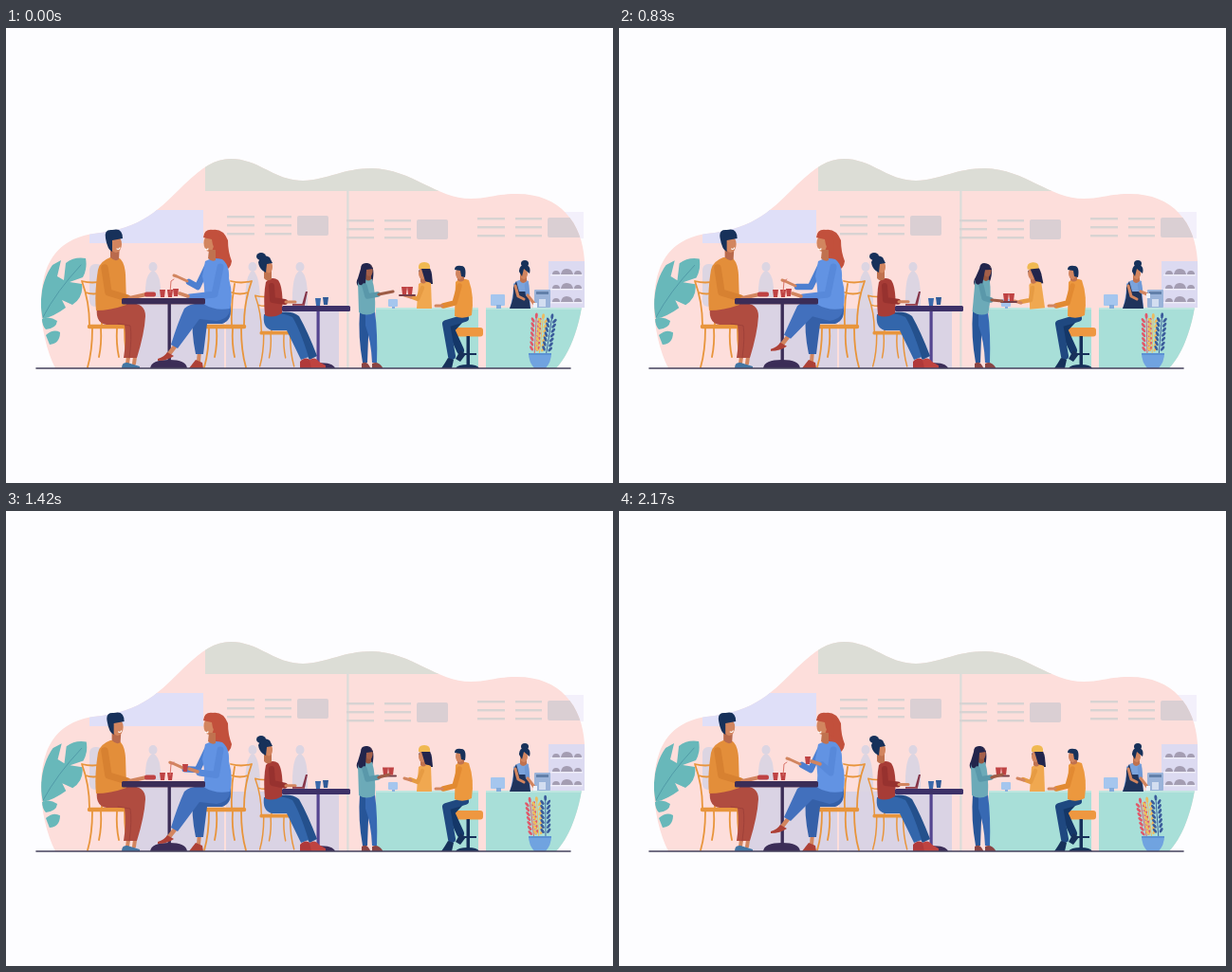
An HTML page that plays this animation: 640 px wide and 480 px high, repeating every 2.26 s.

```html
<!DOCTYPE html>
<html lang="en">
<head>
<meta charset="utf-8">
<title>Cafe</title>
<style>
  html, body { margin: 0; width: 100%; height: 100%; overflow: hidden; background: #fdfdff; }
  svg { display: block; width: 100vw; height: 100vh; }
</style>
</head>
<body>
<svg id="stage" viewBox="0 0 640 480" xmlns="http://www.w3.org/2000/svg"></svg>
<script>
const LOOP = 2260, STEPS = 27;
const NAVY = '#17315a', RUST = '#ad4036', CHAIR = '#e8953c', SKIN = '#d2855f', DARK = '#3b2d57', CUP = '#bf4243';

// Drawing helpers
const fill = (d, c) => `<path d="${d}" fill="${c}"/>`;
const line = (d, c, w = 1.5) =>
  `<path d="${d}" fill="none" stroke="${c}" stroke-width="${w}" stroke-linecap="round" stroke-linejoin="round"/>`;
const rect = (x, y, w, h, c, r = 0) => `<rect x="${x}" y="${y}" width="${w}" height="${h}" rx="${r}" fill="${c}"/>`;
const oval = (x, y, rx, ry, c) => `<ellipse cx="${x}" cy="${y}" rx="${rx}" ry="${ry}" fill="${c}"/>`;
const move = (x, y, body) => `<g transform="translate(${x} ${y})">${body}</g>`;
const turn = (a, x, y, body) => `<g transform="rotate(${a} ${x} ${y})">${body}</g>`;
const repeat = (n, f) => Array.from({ length: n }, (_, i) => f(i)).join('');
const mix = (a, b, k) => a + (b - a) * k;

// Eased 0..1 ramp between two steps
function ramp(s, from, to) {
  const k = Math.min(1, Math.max(0, (s - from) / (to - from)));
  return k * k * (3 - 2 * k);
}

const BLOB = 'M52 359C42 339 36 311 37 287C38 244 58 222 92 217C145 212 162 190 188 165' +
  'C207 147 220 138 237 138C267 138 282 161 313 161C340 160 355 148 386 148' +
  'C428 149 454 180 490 180C507 180 518 175 537 175C583 174 608 205 610 246C612 293 600 338 580 359Z';

function menu(x, y, boxW = 33) {
  const c = '#d8d3d2';
  return repeat(3, i => rect(x, y + i * 9, 29, 2.4, c) + rect(x + 40, y + i * 9, 28, 2.4, c)) +
    rect(x + 74, y, boxW, 21, '#dacfd3', 2);
}

function shelf(y) {
  const c = '#a49db2';
  return rect(574, y, 34, 1.4, '#efeef8') +
    fill(`M576 ${y}q0-4 4-4q4 0 4 4zM585 ${y}q1-6 6-6q6 0 7 6zM599 ${y}q0-4 4-4q4 0 4 4z`, c);
}

function leaf() {
  const c = '#68b8ba';
  return fill('M39 307C34 289 38 265 49 250L58 245L54 262L61 266L63 248Q72 241 84 243' +
      'Q86 254 81 263L67 268L80 270Q82 284 70 292L59 287L63 295Q51 304 39 307Z', c) +
    line('M39 305Q53 278 79 250', '#4b93a3', .8) +
    fill('M38 307Q46 303 54 309Q53 317 42 318Q38 314 38 307Z', c) +
    fill('M42 324Q50 317 57 321Q57 333 46 334Z', c);
}

function room() {
  const shade = '#dcd5e2', band = '#dad3e4';
  const guest = (x, y, h) => oval(x, y, 4.5, 5, shade) +
    fill(`M${x - 8} ${y + h}Q${x - 9} ${y + 7} ${x} ${y + 4}Q${x + 9} ${y + 7} ${x + 8} ${y + h}Z`, shade);
  return `<clipPath id="blob"><path d="${BLOB}"/></clipPath>` +
    rect(571, 194, 38, 28, '#f3f0fb') + '<g clip-path="url(#blob)">' +
    rect(30, 130, 590, 235, '#fddedb') +
    rect(210, 136, 260, 36, '#dcddd6') +
    rect(88, 192, 120, 35, '#dfdff8') +
    rect(359.3, 171, 2.2, 188, '#dbdcd9') +
    menu(233, 198) + menu(359, 202) + menu(497, 200, 37) +
    rect(88, 249, 14, 45, shade, 6) +
    guest(155, 252, 32) + guest(260, 252, 52) + guest(310, 252, 42) +
    rect(136, 292, 94, 67, band) + rect(232, 296, 119, 63, band) +
    rect(390, 296, 108, 63, '#a8dfd8') + rect(506, 296, 105, 63, '#a8dfd8') +
    rect(390, 295, 108, 2, '#bfe6e0') + rect(506, 295, 105, 2, '#bfe6e0') +
    '</g>' + rect(572, 246, 38, 49, '#dcdaf1') + [260, 275, 289].map(shelf).join('');
}

// Side view cafe chair; flip = -1 mirrors it
function chair(x, y, flip, k = 1) {
  return `<g transform="translate(${x} ${y}) scale(${flip * k} ${k})">` +
    line('M-4-46Q4-24 4 0M14-43Q18-22 17 0M-4-46Q7-43 18-46M0-34Q8-31 17-34', CHAIR, 1.8) +
    line('M4 2H45', CHAIR, 4.5) +
    line('M7 4Q7 28 2 45M16 4Q17 20 14 34M41 4Q41 28 46 45M33 4Q32 20 35 34', CHAIR, 1.8) + '</g>';
}

const glass = (x, y, c = CUP) => fill(`M${x - 3} ${y - 4}h6l-1 8h-4z`, c);
const straw = (x, y) => line(`M${x} ${y}l1-12l3-2`, '#d9756a', 1);

function table() {
  return rect(170.5, 290, 3.4, 62, DARK) + fill('M152 359Q153 350 172 350Q190 350 191 359Z', DARK);
}

function man(s) {
  const nod = Math.sin(s / 27 * Math.PI) * 1.8;
  return chair(84, 313, 1) +
    line('M129 347L128 354M136 347L135 354', SKIN, 4) +
    fill('M97 289Q92 311 106 313L125 313Q127 330 124 348L138 348Q146 322 147 304Q147 290 130 290Z', '#b04c40') +
    line('M130 348Q133 326 131 314L118 312', '#9b3e38', .8) +
    fill('M122 359Q122 352 128 353L141 357V359Z', '#4376a3') +
    fill('M97 255Q99 246 110 242H118Q125 245 126 260L127 292Q110 298 95 298Q93 280 97 255Z', '#e38e3a') +
    line('M104 253L108 279L128 285', '#d78131', 7.5) +
    line('M130 285L148 281', SKIN, 4) +
    move(nod, 0, fill('M110 228H120L119 244Q115 247 110 242Z', '#b96a4d') +
      oval(116, 228, 6, 9, SKIN) +
      fill('M105 222Q103 212 112 213Q123 210 123 222L112 224L112 236Q107 234 105 222Z', NAVY) +
      line('M117 233q2 1 3-1', '#fff', 1.2));
}

function redhead(s) {
  const swing = (1 - Math.cos(s / 17 * 2 * Math.PI)) / 2;
  const footY = mix(348, 337, swing);
  const rest = ramp(s, 0, 5) - ramp(s, 16, 20);
  const handX = mix(180, 175, rest), handY = mix(262, 267, rest);
  const lift = ramp(s, 14, 20);
  const cupX = mix(179, 199, lift), cupY = mix(279, 263, lift);
  const kneeY = mix(299, 296, swing);
  return chair(255, 313, -1) +
    line('M204 340L203 352', SKIN, 4) +
    fill('M236 290Q240 308 228 312L212 312L208 344L200 344Q195 320 197 298Z', '#3560a8') +
    fill('M193 359Q196 355 200 350L207 353L208 359Z', RUST) +
    line(`M178 ${footY - 12}L171 ${footY - 3}`, SKIN, 4.5) +
    fill(`M236 288Q240 306 222 309L204 ${kneeY + 8}L181 ${footY - 10}L174 ${footY - 14}` +
      `Q181 ${kneeY + 12} 188 ${kneeY - 3}Q194 ${kneeY - 9} 208 ${kneeY - 8}Z`, '#4270bd') +
    fill(`M160 ${footY + 1}Q167 ${footY - 1} 170 ${footY - 6}L177 ${footY - 2}Q170 ${footY + 3} 160 ${footY + 3}Z`, RUST) +
    fill('M214 214Q228 209 234 224Q234 236 238 246Q237 254 230 256L215 245Z', '#c2503c') +
    line(`M212 252L202 273L${handX + 13} ${handY + 6}`, '#4d7fd0', 6.5) +
    line(`M${handX + 11} ${handY + 5}L${handX} ${handY}l-3-1`, SKIN, 3) +
    fill('M210 246Q218 241 228 244Q236 250 235 264Q240 282 236 296Q221 299 208 291Q211 277 207 262Z', '#6293e3') +
    oval(214, 227, 5.5, 9, SKIN) + fill('M214 234H221L221 245Q217 247 213 243Z', '#c0724f') +
    fill('M208 221Q209 211 219 213Q228 215 226 238Q218 235 217 223Z', '#c2503c') +
    line('M210 233q1 2 3 0', '#fff', 1.2) +
    line(`M226 252L${mix(220, 223, lift)} ${mix(281, 276, lift)}L${cupX + 15} ${cupY + 5}`, '#5889da', 7) +
    line(`M${cupX + 13} ${cupY + 4}L${cupX + 4} ${cupY + 1}`, SKIN, 3.5) + glass(cupX, cupY);
}

function tableTop() {
  return rect(122, 285, 88, 6.5, DARK, 1.5) + rect(146, 278.5, 12, 5, CUP, 2) + glass(165, 280) +
    glass(173, 280) + straw(173, 279);
}

function writer(s) {
  const tap = Math.sin(s * 1.6) * .8;
  return chair(266, 320, 1, .82) +
    rect(327.5, 298, 3.2, 56, '#544590') + fill('M312 359Q314 353 329 353Q345 353 347 359Z', DARK) +
    fill('M284 301Q300 297 309 304Q318 320 328 346L320 350L302 318Z', '#24508c') +
    fill('M272 302Q290 299 302 305Q310 318 319 347L311 350L296 319H280Q270 316 272 302Z', '#3366ab') +
    fill('M310 359V352Q314 347 319 349L325 355V359Z', '#b0393a') +
    fill('M322 359L320 350Q326 346 330 352L337 356V359Z', '#bf4340') +
    fill('M274 268Q280 261 287 266Q293 275 291 301Q281 307 273 303Q271 282 274 268Z', '#a73c36') +
    oval(269, 241, 5, 4, NAVY) + fill('M272 252h8v13q-5 3-8-1z', '#c0724f') + oval(277, 252, 4, 6.5, SKIN) +
    fill('M266 247Q270 237 278 242L281 248L275 249L274 258Q267 255 266 247Z', NAVY) +
    line(`M280 272L281 287L294 ${289 + tap}`, '#97322f', 6) + line(`M295 ${289 + tap}L305 ${289 + tap}`, SKIN, 3) +
    fill('M312 292L316 278L318 278L315 292Z', '#86364a') + rect(302, 291, 13, 1.8, '#95404c') +
    rect(291, 293, 72, 6, '#3d3168', 1.5) + glass(329, 289, '#3a69ab') + glass(337, 288, '#2f5a97');
}

function service(s) {
  const lean = ramp(s, 0, 6) - ramp(s, 13, 17);
  const give = ramp(s, 0, 10), take = ramp(s, 13, 17);
  const trayX = 423 - 12 * give - 8 * take, trayY = 282 + 7 * lean - 2.5 * take;
  const handX = mix(408, 404, Math.max(lean, take)), handY = mix(278, 288, lean);
  const serverX = mix(420, 417, lean), serverY = mix(282, 288, lean);
  const elbowY = mix(281, 287, lean), hair = '#22254c';
  const customer =
    fill('M373 299H384L382 326L381 353H376Q371 325 373 299Z', '#275598') +
    fill('M379 299H389Q392 322 391 353H386Q385 330 379 314Z', '#3769b3') +
    fill('M375 359V354Q380 350 384 358V359Z', '#8a4444') + fill('M386 359V354Q392 351 397 358V359Z', '#8a4444') +
    turn(7 * lean, 381, 304,
      fill('M374 254Q374 247 381 248Q389 249 387 264Q385 278 375 275Q367 271 371 264Z', hair) +
      fill('M371 267Q378 261 386 265Q390 278 389 300Q380 305 372 300Z', '#6caab8') +
      fill('M379 257h6v8q-3 3-6 0z', '#97563f') + oval(383, 256, 3.7, 6, '#a5604a') +
      fill('M375 258Q374 247 383 249L387 254L380 255L379 270Q371 274 371 266Z', hair));
  const server = turn(-6 * lean, 441, 295,
    fill('M435 256Q447 246 449 260L450 270H440Z', hair) +
    fill('M435 270Q441 265 448 269L449 296H433Z', '#f0a850') +
    fill('M437 260h6v8q-3 3-6 0z', '#c0724f') + oval(439, 259, 4, 6, SKIN) +
    fill('M438 254Q446 250 447 268L442 267Z', hair) +
    fill('M435 254Q434 247 441 247Q448 247 447 254Z', '#f0b951'));
  const shX = 378 + 4 * lean;
  return rect(403, 286, 10, 8, '#a5c6ee', 1) + rect(407, 294, 3, 2, '#89b0df') + server +
    line(`M${439 - 3 * lean} 274L434 ${286 + lean}L${serverX + 6} ${serverY + 1}`, '#e69b43', 4.5) +
    line(`M${serverX + 7} ${serverY + 2}L${serverX} ${serverY}`, SKIN, 3) +
    line(`M${trayX - 8} ${trayY}H${trayX + 8}`, '#743f48', 2) +
    glass(trayX - 3, trayY - 5) + glass(trayX + 3, trayY - 5) + customer +
    line(`M${shX} 272L${shX + 3} ${283 + lean * 2}L392 ${elbowY}`, '#5a98aa', 5.5) +
    line(`M393 ${elbowY}L${handX} ${handY}`, '#9d5b45', 3.2);
}

function barGuest() {
  return rect(471, 316, 32, 9.5, '#ee9740', 3) + rect(485.5, 325, 3.5, 31, NAVY) + rect(479, 343, 17, 2, NAVY) +
    fill('M474 359Q476 355 487 355Q497 355 499 359Z', NAVY) +
    line('M482 304L469 318L479 340', '#143768', 8) + line('M484 306L464 312L470 346', '#1f4880', 8) +
    fill('M459 359Q462 355 466 348L472 350L470 359Z', NAVY) + fill('M474 349L479 340L485 344L479 352Z', NAVY) +
    fill('M474 268Q480 262 488 266Q494 283 491 303Q482 308 473 304Z', '#ec983e') +
    fill('M476 259h7v7q-4 3-7 0z', '#c0724f') + oval(478, 259, 4, 6, SKIN) +
    fill('M473 255Q473 250 480 251Q486 251 484 263L480 262L479 256Z', NAVY) +
    line('M478 272L473 290L461 293', '#e28a32', 5.5) + line('M460 293L453 293', SKIN, 3);
}

function barista(s) {
  const up = ramp(s, 0, 5) - ramp(s, 13, 17);
  const y = mix(291, 281, up);
  return rect(511, 281, 15, 12, '#a5c6ee', 1) + rect(517, 292, 5, 4, '#83abdb') +
    rect(557, 276, 17, 19, '#9ab3d9', 1) + rect(559, 278, 13, 3, '#6280aa') + rect(562, 286, 7, 8, '#d3def0') +
    fill('M535 270Q542 263 551 267L553 296H531Q535 283 535 270Z', '#7ba3dc') +
    fill('M538 267L541 278H548L549 268L553 296H531Q536 284 535 274Z', '#20345c') +
    fill('M542 258h7v9q-4 4-7 0z', '#c0724f') + oval(546, 259, 4, 6, SKIN) +
    oval(547, 248.5, 4, 3.5, NAVY) + fill('M541 257Q541 249 548 250Q554 251 552 259L546 254L544 262Z', NAVY) +
    line(`M549 271L550 ${mix(281, 277, up)}`, '#6f99d6', 4.5) +
    line(`M550 ${mix(282, 278, up)}L557 ${y}`, SKIN, 3.2) + line('M537 272L540 283L546 286', SKIN, 3) +
    rect(556, y - 1, 4, 5, '#eef2fa');
}

function frond(x, top, c) {
  return line(`M${x} 346V${top}`, c, .9) + oval(x, top, 1.5, 3, c) +
    repeat(7, i => [-1, 1].map(side =>
      turn(side * 35, x, top + 6 + i * 5, oval(x + side * 2, top + 3 + i * 5, 1.4, 3, c))).join(''));
}

function pot(s) {
  const lean = mix(6, -7, ramp(s, 0, 26));
  return turn(lean, 563, 347, turn(-3, 557, 347, frond(557, 304, '#e0596a')) +
      frond(562, 304, '#edbb5f') + turn(3, 569, 347, frond(569, 303, '#3b5c9b'))) +
    fill('M551 343H575Q575 352 569 359H557Q551 352 551 343Z', '#70a3e0') + rect(551, 343, 24, 2, '#5c92d3');
}

const stage = document.getElementById('stage');
stage.innerHTML = rect(0, 0, 640, 480, '#fdfdff') + room() + '<g id="cast"></g>' +
  line('M32 359H595', '#45415c', 1.6);
const cast = document.getElementById('cast');
let shown = -1;

function draw(time) {
  // Step times are rounded down to hundredths of a second
  const s = Math.floor((time % LOOP + 10) / LOOP * STEPS) % STEPS;
  if (s !== shown) {
    shown = s;
    const sway = Math.sin(s / STEPS * Math.PI) * .6;
    cast.innerHTML = `<g clip-path="url(#blob)">${turn(sway, 42, 320, leaf())}</g>` +
      table() + man(s) + redhead(s) + tableTop() + writer(s) + service(s) + barGuest() + barista(s) + pot(s);
  }
  requestAnimationFrame(now => draw(Math.max(0, now - start)));
}

const start = performance.now();
draw(0);
</script>
</body>
</html>
```
